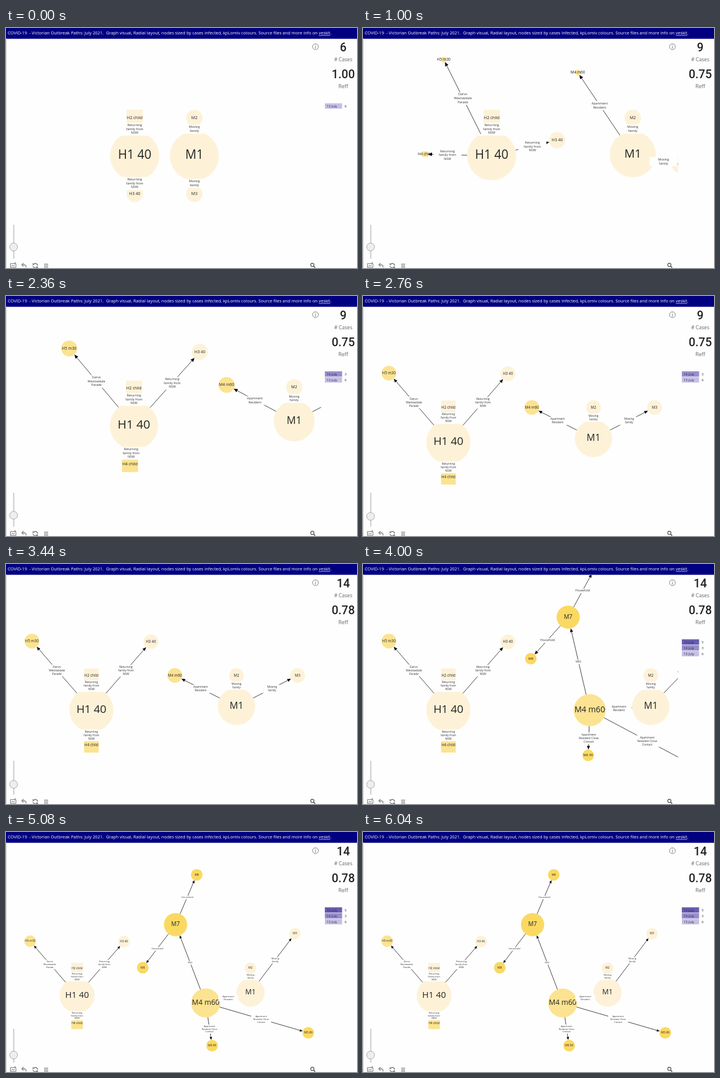
An HTML page with a canvas that plays this animation: 600 by 411 pixels, repeating every 6.08 s.

```html
<!DOCTYPE html>
<html lang="en">
<head>
<meta charset="utf-8">
<title>Outbreak paths</title>
<style>
html, body { margin: 0; width: 100%; height: 100%; overflow: hidden; background: #fefefe; }
canvas { display: block; }
</style>
</head>
<body>
<canvas id="stage" width="600" height="411"></canvas>
<script>
const c = document.getElementById('stage').getContext('2d');
const LOOP = 6080, SANS = '"Open Sans", "Noto Sans", sans-serif';
const PALE = '#fdf2d8', MID = '#fce391', DEEP = '#fad963';

// time -> layout pose; whole numbers are the resting layouts
const TIMELINE = [[0, 0], [40, 0], [640, .8], [1600, 1], [2360, 2], [2640, 3], [3480, 3],
  [3760, 3.75], [4000, 4], [4400, 4.2], [4640, 5], [5040, 6], [LOOP, 6]];
const ZOOM = [1, 1, .98, .9, .9, .82, .71];

const FAMILY = ['Returning', 'family from', 'NSW'], MOVING = ['Moving', 'family'];
const FLAT = ['Apartment', 'Resident'], CLOSE = ['Apartment', 'Resident Close', 'Contact'];
const HOME = ['Household'];

// pos: x, y and radius for each pose after `from`, relative to the parent, before zoom
const nodes = [
  { id: 'H1', text: 'H1 40', fill: PALE, from: 0, pos: [[220, 219, 42], [220, 219, 42], [219, 222, 42],
    [146, 250, 42], [146, 250, 42], [136, 268.5, 42], [121.5, 280, 42]] },
  { id: 'M1', fill: PALE, from: 0, pos: [[322, 219, 42], [481, 216, 39], [493, 214, 35.7],
    [394, 244, 35.5], [492, 244, 35.5], [474, 263, 34.8], [418, 275, 34]] },
  { id: 'H2', text: 'H2 child', parent: 'H1', link: FAMILY, fill: PALE, square: true, from: 0, pos: [[0, -65]] },
  { id: 'H3', text: 'H3 40', parent: 'H1', link: FAMILY, fill: PALE, from: 0,
    pos: [[0, 65], [128, -40], [115, -129], [113, -130]] },
  { id: 'H4', text: 'H4 child', parent: 'H1', link: FAMILY, fill: MID, square: true, from: 1,
    pos: [[-114, -3, 7], [-7, 67], [0, 67]] },
  { id: 'H5', text: 'H5 m30', parent: 'H1', link: ['Darvo', 'Wexlowdale', 'Parade'], fill: MID, from: 1,
    pos: [[-82, -165, 7], [-113, -135], [-113, -131]] },
  { id: 'M2', parent: 'M1', link: MOVING, fill: PALE, from: 0, pos: [[0, -65], [0, -62], [0, -59]] },
  { id: 'M3', parent: 'M1', link: MOVING, fill: PALE, from: 0,
    pos: [[0, 65], [92, 11], [115, -59], [116, -59], [105, -109], [107, -139], [107, -142]] },
  { id: 'M4', text: 'M4 m60', parent: 'M1', link: FLAT, fill: MID, from: 1,
    pos: [[-94, -140, 7], [-118, -63], [-117, -59], [-116, 7, 30.5], [-109, 24, 33.8], [-108, 25, 35]] },
  { id: 'M5', text: 'M5 89', parent: 'M4', link: CLOSE, fill: DEEP, from: 4,
    pos: [[201, 107, 11], [235, 79], [247, 72]] },
  { id: 'M6', text: 'M6 90', parent: 'M4', link: CLOSE, fill: DEEP, from: 4,
    pos: [[-3, 86, 11], [13, 101], [15.5, 103]] },
  { id: 'M7', parent: 'M4', link: ['VRO'], fill: DEEP, from: 4,
    pos: [[-41, -177, 22], [-68, -187, 27], [-72.5, -189, 28]] },
  { id: 'M8', parent: 'M7', link: HOME, fill: DEEP, from: 4, pos: [[-71, 79, 11], [-78, 100], [-79, 104]] },
  { id: 'M9', parent: 'M7', link: HOME, fill: DEEP, from: 4, pos: [[50, -92, 11], [51, -116], [51, -120]] }
];

const mix = (a, b, k) => a + (b - a) * k;

function poseAt(t) {
  const i = TIMELINE.findIndex(k => k[0] > t);
  const [t0, p0] = TIMELINE[i - 1], [t1, p1] = TIMELINE[i];
  return mix(p0, p1, (t - t0) / (t1 - t0));
}

function sample(list, p) {
  const last = list.length - 1, q = Math.min(Math.max(p, 0), last), i = Math.floor(q);
  const a = list[i], b = list[Math.min(i + 1, last)];
  return [0, 1, 2].map(j => mix(a[j] ?? 14, b[j] ?? 14, q - i));
}

function write(s, x, y, size, color = '#222', align = 'center', font = SANS) {
  c.font = `${size}px ${font}`;
  c.fillStyle = color;
  c.textAlign = align;
  c.textBaseline = 'middle';
  c.fillText(s, x, y);
}

function disc(x, y, r, fill, stroke) {
  c.beginPath();
  c.arc(x, y, r, 0, 7);
  if (fill) { c.fillStyle = fill; c.fill(); }
  if (stroke) { c.strokeStyle = stroke; c.stroke(); }
}

function box(x, y, w, h, fill) {
  c.fillStyle = fill;
  c.fillRect(x, y, w, h);
}

function path(d, color = '#777', width = 1) {
  c.lineWidth = width;
  c.strokeStyle = color;
  c.stroke(new Path2D(d));
}

function drawLink(a, b, lines, z) {
  const dx = b.x - a.x, dy = b.y - a.y, d = Math.hypot(dx, dy) || 1, ux = dx / d, uy = dy / d;
  const x0 = a.x + ux * a.r, y0 = a.y + uy * a.r, x1 = b.x - ux * b.r, y1 = b.y - uy * b.r;
  const len = 7 * z, half = 3 * z, bx = x1 - ux * len, by = y1 - uy * len;
  path(`M${x0} ${y0}L${bx} ${by}`, '#111', .8);
  c.fillStyle = '#000';
  c.fill(new Path2D(`M${x1} ${y1}L${bx - uy * half} ${by + ux * half}L${bx + uy * half} ${by - ux * half}Z`));
  const mx = (x0 + x1) / 2, my = (y0 + y1) / 2 + .8, row = 6.7 * z, h = row * lines.length + 2 * z;
  box(mx - 24 * z, my - h / 2, 48 * z, h, '#fefefe');
  lines.forEach((s, i) => write(s, mx, my + (i - (lines.length - 1) / 2) * row, 5.5 * z, '#333'));
}

function drawGraph(p) {
  const i = Math.floor(p), z = mix(ZOOM[i], ZOOM[Math.min(i + 1, 6)], p - i), at = {}, shown = [];
  for (const n of nodes) {
    const grow = n.from ? Math.min(1, (p - n.from + .4) / .4) : 1;
    if (grow <= 0) continue;
    const [x, y, r] = sample(n.pos, p - n.from), up = at[n.parent];
    at[n.id] = { x: up ? up.x + x * z : x, y: up ? up.y + y * z : y, r: r * z * grow };
    shown.push(n);
  }
  c.save();
  c.beginPath();
  c.rect(1, 19, 537.5, 375);
  c.clip();
  for (const n of shown) {
    const { x, y, r } = at[n.id];
    if (n.square) box(x - r, y - r, 2 * r, 2 * r, n.fill);
    else disc(x, y, r, n.fill);
  }
  for (const n of shown) {
    const { x, y, r } = at[n.id];
    write(n.text || n.id, x, y, Math.max(r, 13 * z) * .5);
  }
  for (const n of shown) if (n.parent) drawLink(at[n.parent], at[n.id], n.link, z);
  c.restore();
  return z;
}

function drawHeader() {
  box(0, 0, 600, 18.5, '#000080');
  const start = 'COVID-19  - Victorian Outbreak Paths: July 2021.  Graph visual, Radial layout, nodes sized ' +
    'by cases infected, kpLomiv colours. Source files and more info on ';
  const site = 'veskit';
  write(start, 3, 9, 7.42, '#fff', 'left');
  const x = 3 + c.measureText(start).width, w = c.measureText(site).width;
  write(site + '.', x, 9, 7.42, '#fff', 'left');
  box(x, 12.5, w, .7, '#fff');
}

function drawPanel(t) {
  const day = t < 760 ? 0 : t < 3240 ? 1 : 2;
  const big = '"Roboto", sans-serif';
  write([6, 9, 14][day], 576.5, 34, '500 20', '#222', 'center', big);
  write('# Cases', 576.5, 54.5, 8.6, '#666');
  write(['1.00', '0.75', '0.78'][day], 576.5, 80, '500 20', '#222', 'center', big);
  write('Reff', 576.5, 100.5, 9, '#666');
  const loading = (t >= 760 && t < 1080) || (t >= 3240 && t < 3560);
  if (loading) return;
  for (let i = 0; i <= day; i++) {
    const y = 129 + (day - i) * 10;
    box(545, y, 29.5, 9.2, ['#c6c0e2', '#988fcb', '#685eb0'][i]);
    write(`${13 + i} July`, 557, y + 5, 6, '#2b2560');
    write([6, 3, 5][i], 580.5, y + 5, 6, '#333');
  }
}

function drawTools(z) {
  box(0, 18, 1, 393, '#d0d0d0');
  c.lineWidth = .9;
  disc(529, 32, 5, null, '#777');
  box(528.5, 31, 1, 4, '#777');
  box(528.5, 29, 1, 1, '#777');
  box(12, 337, 2.4, 58, '#d3d3d3');
  c.lineWidth = 1;
  disc(13, 375 + (1 - z) * 24, 6.7, '#eee', '#aaa');
  path('M7.5 403.500H17V410H7.500ZM9 408.500L11 406L13 408L15 405.500M14 402H17');
  path('M30 402.500L27 405.500L30 408.500M27 405.500H31Q34.500 406 34.500 410', '#888', 1.3);
  path('M47 404.500A4 4 0 0 1 54 407M53 409.500A4 4 0 0 1 46 407M46 403V405H48.500M54 411V409H51.500', '#666', 1.1);
  path('M65 404.500H72M65 407H72M65 409.500H72M66.500 403V411M68.700 403V411M71 403V411', '#888', .7);
  c.lineWidth = 1.1;
  disc(523.7, 405.7, 2.8, null, '#444');
  path('M525.800 407.800L528.500 410.500', '#444', 1.4);
}

function frame(now) {
  const t = now % LOOP;
  box(0, 0, 600, 411, '#fefefe');
  const z = drawGraph(poseAt(t));
  drawHeader();
  drawPanel(t);
  drawTools(z);
  requestAnimationFrame(() => frame(performance.now() - start));
}
const start = performance.now();
frame(0);
</script>
</body>
</html>
```
